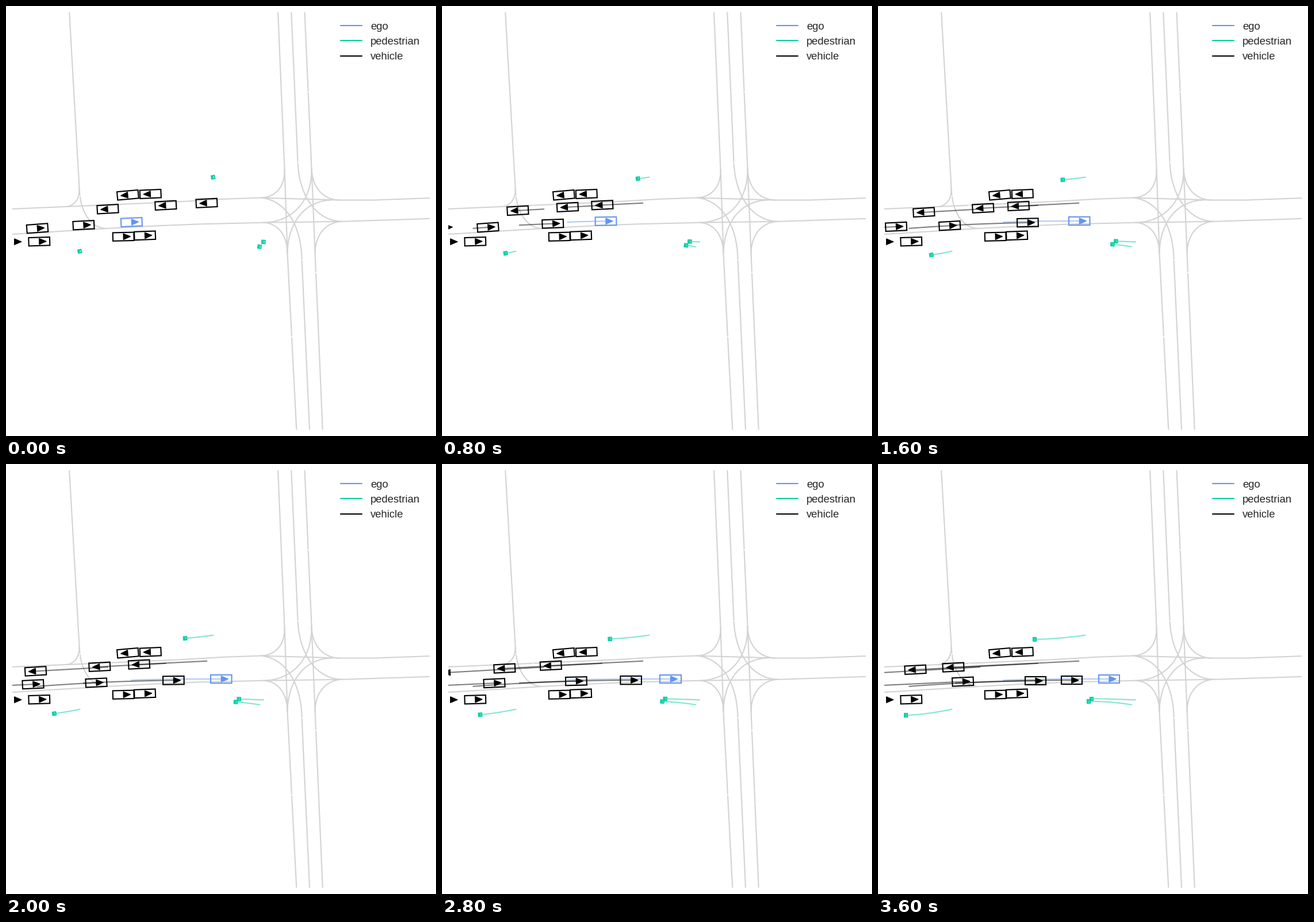
Animation of 748 by 748 pixels, one loop 3.8 s. Source, as a matplotlib script:

```python
import numpy as np
import matplotlib.pyplot as plt
from matplotlib.animation import FuncAnimation
from matplotlib.lines import Line2D
from matplotlib.patches import PathPatch, Polygon
from matplotlib.path import Path

SIZE, DPI = 748, 100
LOW, HIGH = 11, 737
STEP, FRAMES = 200, 19
LINE = 1.5
EGO, PED, CAR, ROAD = "#6495ed", "#03cea4", "black", "#d3d3d3"
TIMES = np.arange(FRAMES) * STEP
KEYS = np.array([0, 400, 1200, 2000, 2800, 3600.0])

plt.rcParams["font.family"] = "Liberation Sans"
fig = plt.figure(figsize=(SIZE / DPI, SIZE / DPI), dpi=DPI, facecolor="white")
side = (HIGH - LOW) / SIZE
ax = fig.add_axes([LOW / SIZE, 1 - HIGH / SIZE, side, side])
ax.set_xlim(LOW, HIGH)
ax.set_ylim(HIGH, LOW)
ax.axis("off")


def road(*pts):
    ax.plot(*zip(*pts), color=ROAD, lw=LINE, zorder=1)


def bend(start, corner, end, pull=0.6):
    """Turning lane that rounds off a corner."""
    a, c, b = map(np.array, (start, corner, end))
    path = Path([a, a + pull * (c - a), b + pull * (c - b), b],
                [Path.MOVETO] + [Path.CURVE4] * 3)
    ax.add_patch(PathPatch(path, fc="none", ec=ROAD, lw=LINE, zorder=1))


def draw_map():
    # where the straight lanes meet the crossing
    nw, sw = (443, 333.6), (447, 376.8)
    ne, se = (580, 337.6), (585, 374.8)
    north = [(484.6, 285), (507.6, 272), (531.6, 283)]
    south = [(489.5, 430), (514.6, 441), (537.6, 430)]
    side_end = (127.6, 318)

    road((110, 8), side_end)
    road((8, 353.1), (105, 349), (300, 340.5), (380, 335.8), nw, ne,
         (640, 337.6), (740, 334))
    road((8, 397.2), (175, 387), (270, 382), (340, 379.3), sw, se,
         (740, 369.8))
    for i, (a, b) in enumerate(zip(north, south)):
        road((473 + 23.2 * i, 8), a)
        road(b, (505.5 + 22.7 * i, 740))
        if i != 1:
            road(a, b)

    bend(side_end, (128.5, 347), (105, 349))
    bend(side_end, (130, 387), (175, 387))
    bend(north[0], (486, 333), nw)
    bend(north[2], (533, 337), ne)
    bend(south[0], (489, 377), sw)
    bend(south[2], (538, 376), se)
    bend(north[1], (512, 374), se)
    bend(south[1], (513, 339), nw)
    bend(north[2], (533, 376), sw)
    bend(south[0], (491, 339), (566, 337.6))

    # small breaks where lane pieces join
    x, y = zip(north[1], south[1], (128.3, 330), (158, 346.7), (526, 149),
               (539, 463), (496.6, 575))
    ax.scatter(x, y, s=3, c="white", lw=0, zorder=2)


def draw_legend():
    rows = {"ego": EGO, "pedestrian": PED, "vehicle": CAR}
    lines = [Line2D([], [], color=c, lw=LINE, solid_capstyle="round")
             for c in rows.values()]
    ax.legend(lines, rows, loc="upper right", frameon=False, fontsize=13.33,
              labelcolor="#262626")


def glide(keys):
    """Smooth cubic motion through the key positions."""
    v = np.array(keys, float)
    m = np.gradient(v, KEYS)
    k = np.clip(np.searchsorted(KEYS, TIMES, side="right") - 1, 0, len(v) - 2)
    h = KEYS[k + 1] - KEYS[k]
    s = (TIMES - KEYS[k]) / h
    return ((1 + 2 * s) * (1 - s) ** 2 * v[k] + s * (1 - s) ** 2 * h * m[k]
            + s * s * (3 - 2 * s) * v[k + 1] + s * s * (s - 1) * h * m[k + 1])


class Agent:
    def __init__(self, x, y, slope, color=CAR, facing=1, size=(36.6, 14.4),
                 arrow=(12.2, 5.2)):
        self.x, self.y = x, y
        self.tilt = np.arctan(slope)
        w, h = size[0] / 2, size[1] / 2
        self.frame = np.array([(-w, -h), (w, -h), (w, h), (-w, h)])
        n, b = arrow
        self.head = np.array([(0, -b), (facing * n, 0), (0, b)])
        self.trail, = ax.plot([], [], color=color, lw=LINE, alpha=0.5, zorder=3)
        self.box = ax.add_patch(Polygon(self.frame, fc="none", ec=color,
                                        lw=LINE, zorder=4))
        self.tip = ax.add_patch(Polygon(self.head, fc=color, ec=color, lw=0.9,
                                        joinstyle="round", zorder=4))

    def place(self, shape, i):
        c, s = np.cos(self.tilt[i]), np.sin(self.tilt[i])
        return shape @ np.array([(c, s), (-s, c)]) + (self.x[i], self.y[i])

    def show(self, i):
        corners = self.place(self.frame, i)
        self.box.set_xy(corners)
        self.box.set_visible(bool(corners.min() > LOW and corners.max() < HIGH))
        self.tip.set_xy(self.place(self.head, i))
        self.trail.set_data(self.x[:i + 1], self.y[:i + 1])
        self.trail.set_visible(bool(np.ptp(self.x) > 0 and i > 0))


def mover(x, y0, y1, power, **style):
    """Follow a path that levels off from y0 to y1; heading is its slope."""
    span = x[-1] - x[0]
    left = np.clip((x[-1] - x) / span, 0, 1)
    y = y1 + (y0 - y1) * left ** power
    slope = (y1 - y0) * power * left ** (power - 1) / span
    return Agent(x, y, slope, **style)


def car(keys, y0, y1, power=1, color=CAR):
    facing = 1 if keys[-1] > keys[0] else -1
    return mover(glide(keys), y0, y1, power, color=color, facing=facing)


def parked(x, y, slope, facing=1):
    still = np.ones(FRAMES)
    return Agent(x * still, y * still, slope * still, facing=facing)


def walker(x0, x1, y0, y1, power):
    return mover(np.linspace(x0, x1, FRAMES)[:FRAMES], y0, y1, power, color=PED,
                 facing=-1, size=(5.4, 5.4), arrow=(2.2, 1.6))


draw_map()
draw_legend()

agents = [
    car([218.4, 249.2, 320.2, 374.3, 397.5, 402], 376, 374, 4, EGO),
    # eastbound
    car([135, 161.5, 226, 291.4, 328.7, 336.8], 381.2, 376.1, 2),
    car([54.5, 66.5, 98, 157, 233.4, 274], 386.8, 377.2, 1.7),
    car([-18, -6, 18.5, 47, 91, 147.6], 386.2, 378.6),
    # westbound
    car([177, 153.5, 109, 51.5, 14.3, -18], 353.3, 364.4),
    car([277.8, 241.5, 201, 162.8, 108.8, 65], 346.8, 357.8),
    car([349, 307.8, 258.2, 231.5, 189.3, 131], 342.8, 353.6),
    # standing still
    parked(211.9, 328.8, -0.088, -1),
    parked(251.3, 327, -0.044, -1),
    parked(204.2, 401.2, -0.023),
    parked(241.6, 399.3, -0.035),
    parked(57.8, 409.7, -0.028),
    parked(14.6, 410.1, 0),
    # on foot
    walker(360.2, 272.7, 297.8, 305, 1.7),
    walker(128.2, 48.7, 426.7, 437, 1.6),
    walker(447.9, 371.2, 410.4, 408.2, 1.4),
    walker(441, 366.6, 418.7, 412.8, 2),
]


def update(i):
    for agent in agents:
        agent.show(i)
    return []


anim = FuncAnimation(fig, update, frames=FRAMES, interval=STEP,
                     init_func=lambda: update(0), repeat=True, repeat_delay=0)
plt.show()
```
